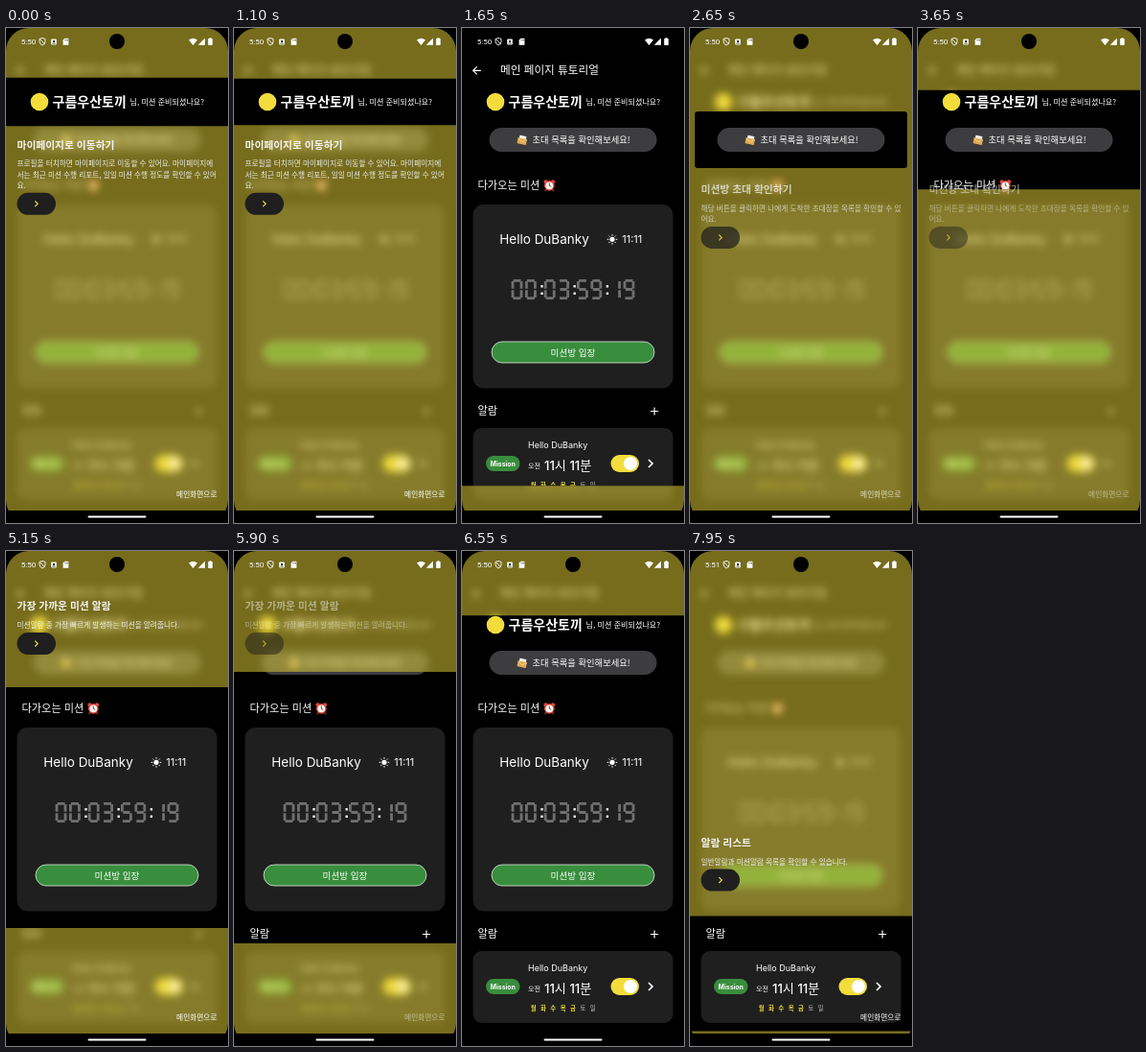
Write an HTML page that moves like this. It is 232 by 516 pixels and loops after 8 s.

```html
<!DOCTYPE html>
<html lang="ko">
<head>
<meta charset="utf-8">
<title>Tutorial</title>
<style>
  html, body { margin: 0; width: 100%; height: 100%; overflow: hidden; background: #000; }
  svg { display: block; width: 100%; height: 100%; }
  text { font-family: 'Noto Sans CJK KR', 'Noto Sans CJK', sans-serif; white-space: pre; }
  .latin { font-family: Inter, 'Noto Sans CJK KR', sans-serif; }
  .status { font-family: Roboto, sans-serif; }
</style>
</head>
<body>
<svg id="stage" viewBox="0 0 232 516" xmlns="http://www.w3.org/2000/svg">
  <defs>
    <clipPath id="screen"><rect width="232" height="516" rx="24"/></clipPath>
    <clipPath id="outside"><path id="shade" clip-rule="evenodd"/></clipPath>
    <filter id="blur" filterUnits="userSpaceOnUse" x="-20" y="-20" width="272" height="556" color-interpolation-filters="sRGB">
      <feGaussianBlur stdDeviation="4.2"/>
    </filter>
  </defs>
  <rect width="232" height="516"/>
  <g id="page"></g>
  <g clip-path="url(#screen)">
    <g clip-path="url(#outside)">
      <rect width="232" height="503"/>
      <use href="#page" filter="url(#blur)"/>
      <rect width="232" height="503" fill="#ecd838" fill-opacity=".5"/>
    </g>
  </g>
  <g id="guides"></g>
  <g id="system"></g>
</svg>
<script>
const LOOP = 8000, W = 232, H = 503;
const MOVE = 600, FADE = 300, STEP = 2262, FIRST_CLOSE = 1229.5, PULSE = 530;
const GREEN = '#388e3c', YELLOW = '#f3dd3d';
const $ = id => document.getElementById(id);

// Text placed by its vertical centre
const txt = (x, cy, size, str, o = {}) =>
  `<text x="${x}" y="${(cy + size * .37).toFixed(2)}" font-size="${size}" fill="${o.fill || '#fff'}"` +
  ` font-weight="${o.weight || 400}" text-anchor="${o.anchor || 'start'}" class="${o.cls || ''}">${str}</text>`;
const box = (x, y, w, h, r, fill, extra = '') =>
  `<rect x="${x}" y="${y}" width="${w}" height="${h}" rx="${r}" fill="${fill}" ${extra}/>`;
const dot = (x, y, r, fill) => `<circle cx="${x}" cy="${y}" r="${r}" fill="${fill}"/>`;
const line = (d, color, w, extra = '') =>
  `<path d="${d}" fill="none" stroke="${color}" stroke-width="${w}" ${extra}/>`;
const shape = (d, fill) => `<path d="${d}" fill="${fill}"/>`;

// Seven-segment digits
const SEGMENTS = {
  a: 'M2 1.4H10', b: 'M10.5 2V9.8', c: 'M10.5 11.2V19', d: 'M2 19.6H10',
  e: 'M1.5 11.2V19', f: 'M1.5 2V9.8', g: 'M2.4 10.5H9.6'
};
const DIGITS = { 0: 'abcdef', 1: 'bc', 3: 'abcdg', 5: 'acdfg', 9: 'abcdfg' };
const digit = (x, y, n) => `<g transform="translate(${x} ${y})">` +
  line([...DIGITS[n]].map(s => SEGMENTS[s]).join(''), '#707070', 2.8) + '</g>';

function timer(x, y, pairs) {
  return pairs.map((p, i) => {
    const px = x + i * 34.2;
    const colon = i < pairs.length - 1
      ? box(px + 30.8, y + 6, 2.4, 2.6, .3, '#eee') + box(px + 30.8, y + 13.4, 2.4, 2.6, .3, '#eee') : '';
    return digit(px, y, p[0]) + digit(px + 14.4, y, p[1]) + colon;
  }).join('');
}

function sun(x, y) {
  let rays = '';
  for (let i = 0; i < 8; i++) {
    const c = Math.cos(i * Math.PI / 4), s = Math.sin(i * Math.PI / 4);
    rays += `M${x + 3.7 * c} ${y + 3.7 * s}L${x + 5.3 * c} ${y + 5.3 * s}`;
  }
  return dot(x, y, 2.6, '#fff') + line(rays, '#fff', 1);
}

const alarmClock = (x, y) =>
  dot(x - 3.8, y - 4, 2, '#e2493f') + dot(x + 3.8, y - 4, 2, '#e2493f') +
  line(`M${x - 3} ${y + 4}l-1.6 1.8M${x + 3} ${y + 4}l1.6 1.8`, '#b9342d', 1.3) +
  dot(x, y, 5.4, '#e2493f') + dot(x, y, 3.9, '#f6f3ee') +
  line(`M${x} ${y - 2.7}V${y}L${x + 1.9} ${y + 1}`, '#333', .8);

const letter = (x, y) => `<g transform="rotate(12 ${x} ${y})">` +
  box(x - 3.6, y - 4.6, 7.2, 6, .6, '#f4f1ea') +
  box(x - 4.8, y - 1.6, 9.6, 6, .8, '#e0aa55') +
  line(`M${x - 4.6} ${y - 1.2}L${x} ${y + 2}L${x + 4.6} ${y - 1.2}`, '#f3d59a', .8) + '</g>';

const chevron = (x, y, r, color, w) => line(`M${x - r / 2} ${y - r}l${r} ${r}l${-r} ${r}`, color, w);

function page() {
  const days = [...'월화수목금토일'].map((d, i) => txt(74.6 + i * 10.35, 476.3, 6.4, d, {
    anchor: 'middle', weight: i < 5 ? 700 : 400, fill: i < 5 ? YELLOW : '#c8c8c8'
  })).join('');
  return [
    line('M19.8 44.3H11.8M15.6 40.3L11.6 44.3L15.6 48.3', '#fff', 1.2),
    txt(40, 44, 11.65, '메인 페이지 튜토리얼'),

    dot(35, 77, 9.3, YELLOW),
    txt(48.5, 77, 14, '구름우산토끼', { weight: 700 }),
    txt(129.5, 77.3, 8.1, '님, 미션 준비되셨나요?'),

    box(28.5, 104, 175, 25, 12.5, '#3d3d3f'),
    letter(63, 116.8),
    txt(73.5, 116.7, 9.3, '초대 목록을 확인해보세요!'),

    txt(16.5, 164, 11.2, '다가오는 미션'),
    alarmClock(91.3, 164.3),

    box(11.5, 184, 209, 191.5, 11, '#1f1f1f'),
    txt(39.3, 220.3, 13.5, 'Hello DuBanky', { cls: 'latin' }),
    sun(157, 220.3),
    txt(167.2, 220.3, 11, '11:11', { cls: 'latin' }),
    timer(51.5, 262, ['00', '03', '59', '19']),
    box(31, 327, 170, 22, 11, GREEN, 'stroke="#fff" stroke-width=".8" stroke-opacity=".85"'),
    txt(116, 338, 9.6, '미션방 입장', { anchor: 'middle', weight: 500 }),

    txt(16.5, 399, 11.2, '알람'),
    line('M197 399.5H205.2M201.1 395.4V403.6', '#fff', 1.2),

    box(11.5, 417, 209, 75, 9, '#1f1f1f'),
    txt(69, 435, 9, 'Hello DuBanky', { cls: 'latin' }),
    box(25, 446, 35.5, 16, 8, GREEN),
    txt(42.7, 454.1, 6.9, 'Mission', { cls: 'latin', weight: 700, anchor: 'middle' }),
    txt(69, 456, 7.1, '오전'),
    txt(86, 456, 13.1, '11시 11분', { cls: 'latin', weight: 500 }),
    box(155.5, 445, 29.5, 18, 9, YELLOW),
    dot(176, 454, 7, '#fff'),
    chevron(197, 454, 4, '#fff', 1.7),
    days
  ].join('');
}

function system() {
  return [
    dot(116, 14, 8, '#000'),
    `<g id="clock">${txt(15.8, 14.2, 8, '5:50', { cls: 'status' })}</g>`,
    line('M38 10.4L41 11.5V14.2Q40.8 16.7 38 18Q35.2 16.7 35 14.2V11.5ZM35.2 11.4L40.8 17', '#fff', .9),
    box(47.2, 11.4, 5.6, 6, .8, '#fff') + dot(50, 14, 1.2, '#222') + box(48.4, 15.8, 3.2, .7, 0, '#222'),
    shape('M61.4 10.8H65.4V17.8H59.6V12.6Z', '#fff') + line('M61.8 11.8V13.4M63.2 11.8V13.4M64.5 11.8V13.4', '#333', .6),
    shape('M191 12.6Q195.5 9 200 12.6L195.5 18Z', '#fff'),
    shape('M208 10.6V17.8H200.8Z', '#fff'),
    box(211.2, 11, 4.6, 7, .8, '#fff') + box(212.5, 10.2, 2, 1.2, 0, '#fff'),
    box(85.5, 508.5, 61, 2, 1, '#fff')
  ].join('');
}

// Highlighted areas at rest, with the hint that belongs to each
const stops = [
  { x: 0, y: 55, w: 232, h: 44, top: 121.6, title: '마이페이지로 이동하기', body: [
    '프로필을 터치하면 마이페이지로 이동할 수 있어요. 마이페이지에',
    '서는 최근 미션 수행 리포트, 일일 미션 수행 정도를 확인할 수 있어',
    '요.'] },
  { x: 9, y: 91, w: 214, h: 51, top: 168, title: '미션방 초대 확인하기', body: [
    '해당 버튼을 클릭하면 나에게 도착한 초대장을 목록을 확인할 수 있',
    '어요.'] },
  { x: 0, y: 147.5, w: 232, h: 240, top: 57.5, title: '가장 가까운 미션 알람', body: [
    '미션알람 중 가장 빠르게 발생하는 미션을 알려줍니다.'] },
  { x: 0, y: 381.3, w: 232, h: 118.4, top: 304, title: '알람 리스트', body: [
    '일반알람과 미션알람 목록을 확인할 수 있습니다.'] }
];
stops.forEach((s, i) => {
  s.close = FIRST_CLOSE + i * STEP;
  s.open = s.close - PULSE * (i ? 2 : 4);
  s.reach = (H + Math.max(s.w, s.h) + Math.max(s.y, H - s.y)) / 2;
});

function guide(s) {
  const last = s.top + 20 + (s.body.length - 1) * 11.3;
  return '<g opacity="0">' +
    txt(11.5, s.top, 10.75, s.title, { weight: 600, fill: '#f4f4f4' }) +
    s.body.map((b, i) => txt(11.5, s.top + 20 + i * 11.3, 7.65, b, { fill: '#eee' })).join('') +
    box(11.5, last + 7.6, 40.5, 23, 11.5, '#1f1f1f') +
    chevron(31.7, last + 19.1, 2.9, YELLOW, 1.2) +
    txt(220.5, 485.7, 7.7, '메인화면으로', { anchor: 'end' }) + '</g>';
}

const clamp = v => Math.min(1, Math.max(0, v));

function bezier(x1, y1, x2, y2) {
  const at = (a, b, s) => 3 * (1 - s) * (1 - s) * s * a + 3 * (1 - s) * s * s * b + s * s * s;
  return x => {
    if (x <= 0 || x >= 1) return clamp(x);
    let lo = 0, hi = 1;
    for (let i = 0; i < 24; i++) {
      const mid = (lo + hi) / 2;
      if (at(x1, x2, mid) < x) lo = mid; else hi = mid;
    }
    return at(y1, y2, lo);
  };
}
const focusEase = bezier(.4, 0, .2, 1), pulseEase = bezier(.25, .1, .25, 1);

// 1 while resting on the area, 0 when the hole spans the whole screen
function focus(s, t) {
  if (t < s.open) return focusEase(1 - (s.open - t) / MOVE);
  if (t >= s.close) return focusEase(1 - (t - s.close) / MOVE);
  const phase = (t - s.open) / PULSE % 2;
  return 1 - .01 * pulseEase(phase < 1 ? phase : 2 - phase);
}

function shadePath(s, t) {
  const grow = s.reach * (1 - focus(s, t)), r = 3;
  const x = s.x - grow, y = s.y - grow, w = s.w + 2 * grow, h = s.h + 2 * grow;
  const arc = (dx, dy) => `a${r} ${r} 0 0 1 ${dx} ${dy}`;
  // Full-width areas reach past the screen edge, so their corners stay hidden
  const edge = s.w >= W ? 6 : 0;
  return `M0 0H${W}V${H}H0ZM${x - edge + r} ${y}h${w + 2 * edge - 2 * r}${arc(r, r)}v${h - 2 * r}${arc(-r, r)}` +
    `h${2 * r - w - 2 * edge}${arc(-r, -r)}v${2 * r - h}${arc(r, -r)}Z`;
}

$('page').innerHTML = page();
$('system').innerHTML = system();
$('guides').innerHTML = stops.map(guide).join('');
const guides = [...$('guides').children];
const clock = $('clock').firstChild;

function render(t) {
  const current = stops.find(s => t < s.close + MOVE);
  $('shade').setAttribute('d', shadePath(current, t));
  stops.forEach((s, i) => {
    const alpha = clamp((t - s.open) / FADE) * (1 - clamp((t - s.close) / FADE));
    guides[i].setAttribute('opacity', alpha.toFixed(3));
  });
  clock.textContent = t < 7250 ? '5:50' : '5:51';
}

const start = performance.now();
function tick() {
  render((performance.now() - start) % LOOP);
  requestAnimationFrame(tick);
}
tick();
</script>
</body>
</html>
```
